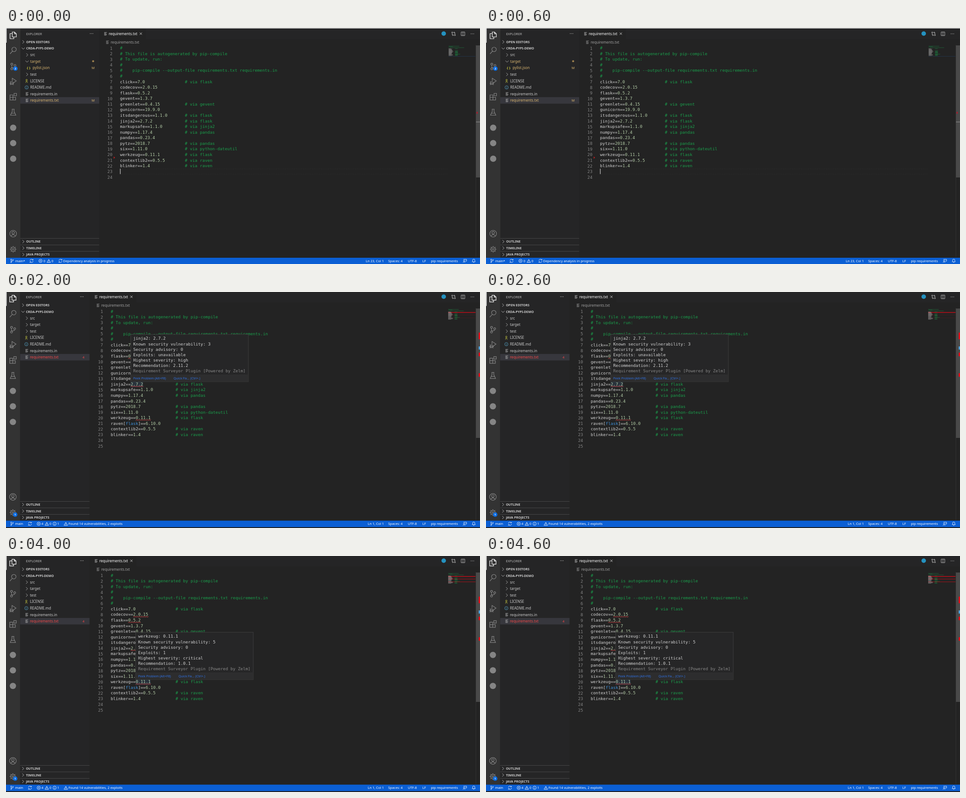
Animation, 1058 px wide and 529 px high, one loop 5 s. Source, as an HTML page:

```html
<!DOCTYPE html>
<html lang="en">
<head>
<meta charset="utf-8">
<title>Dependency check in a code editor</title>
<style>
html, body { margin: 0; width: 100%; height: 100%; overflow: hidden; background: #222; }
svg { display: block; width: 1058px; height: 529px; }
text { white-space: pre; font-family: "Noto Sans", "Open Sans", sans-serif; }
.mono { font-family: "DejaVu Sans Mono", monospace; font-size: 9.25px; }
</style>
</head>
<body>
<svg id="stage" viewBox="0 0 1058 529"></svg>
<script>
const W = 1058, H = 529, CHAR = 5.57, LINE = 12.565, ROW = 14.57;
const STEP = 1000;

const HEADER = [
  '#', '# This file is autogenerated by pip-compile', '# To update, run:', '#',
  '#    pip-compile --output-file requirements.txt requirements.in', '#'
];
const PACKAGES = [
  'click==7.0 flask', 'codecov==2.0.15', 'flask==0.5.2', 'gevent==1.3.7',
  'greenlet==0.4.15 gevent', 'gunicorn==19.9.0', 'itsdangerous==1.1.0 flask',
  'jinja2==2.7.2 flask', 'markupsafe==1.1.0 jinja2', 'numpy==1.17.4 pandas',
  'pandas==0.23.4', 'pytz==2018.7 pandas', 'six==1.11.0 python-dateutil',
  'werkzeug==0.11.1 flask', 'raven[flask]==6.10.0', 'contextlib2==0.5.5 raven',
  'blinker==1.4 raven'
];
const PROBLEMS = { codecov: '#f14c4c', flask: '#f14c4c', gunicorn: '#3794ff', jinja2: '#f14c4c', werkzeug: '#f14c4c' };

const BUSY = { busy: true, side: 208, dx: 0, dy: 0, bg: '#232323', bar: '#0b5fd4', comment: '#1a9f4c' };
const DONE = { side: 188, dx: 0, dy: -2, bg: '#1f1f1f', bar: '#0664cc', comment: '#459c42' };
const HOVER = { ...DONE, side: 187, dx: -0.6, bg: '#232323', bar: '#0b5fd4', comment: '#1a9f4c' };
const SCENES = [
  BUSY,
  { ...DONE, notice: true },
  { ...HOVER, faded: true, tip: { x: 278.5, y: 95, line: 14, facts: ['jinja2', '2.7.2', 3, 0, 'unavailable', 'high', '2.11.2'] } },
  { ...HOVER, faded: true, cursor: true, tip: { x: 289.5, y: 71, line: 12, facts: ['gunicorn', '19.9.0', 0, 1, 'unavailable', 'medium', '20.0.4'] } },
  { ...HOVER, tip: { x: 289.5, y: 171, line: 20, facts: ['werkzeug', '0.11.1', 5, 0, 1, 'critical', '1.0.1'] } }
];

// Drawing helpers; y is the vertical middle of text and icons.
const rect = (x, y, w, h, fill, extra = '') => `<rect x="${x}" y="${y}" width="${w}" height="${h}" fill="${fill}" ${extra}/>`;
const circle = (x, y, r, fill) => `<circle cx="${x}" cy="${y}" r="${r}" fill="${fill}"/>`;
const label = (x, y, s, fill = '#ccc', size = 8.1, extra = '') =>
  `<text x="${x}" y="${y + size * 0.36}" font-size="${size}" fill="${fill}" ${extra}>${s}</text>`;
const mono = (x, y, s, fill = '#d4d4d4', extra = '') => `<text class="mono" x="${x}" y="${y + 3.2}" fill="${fill}" ${extra}>${s}</text>`;
const span = (s, fill) => `<tspan fill="${fill}">${s}</tspan>`;
const ring = (x, y, r) => `M${x - r} ${y}a${r} ${r} 0 1 0 ${2 * r} 0a${r} ${r} 0 1 0 ${-2 * r} 0`;
const spokes = Array.from({ length: 8 }, (_, i) => {
  const c = Math.cos(i * Math.PI / 4), s = Math.sin(i * Math.PI / 4);
  return `M${5 * c} ${5 * s}L${7.3 * c} ${7.3 * s}`;
}).join('');

const ICONS = {
  files: 'M-2-7.5h5l4 4v7h-9zM3-7.5v4h4M-2-4h-5v11.500h8.500v-4',
  search: ring(2, -2, 5) + 'M-1.500 2L-7 8',
  git: ring(-3, -5, 2.2) + ring(-3, 5.500, 2.2) + ring(4, -2, 2.2) + 'M-3-3v6M4 0q0 3-7 3',
  debug: 'M-2-1v-6.500l9 6-7 5' + ring(-3, 3.500, 3) + 'M-8 4h10M-7 0l2 1M-7 7.500l2-2M1 7.500l-2-2',
  extensions: 'M-7-4h6.500v5.500h6v6h-12.500zM-7 1.500h6.500v6M2-7.500h5.500v5.500h-5.500z',
  beaker: 'M-3-7h6M-2-7v5l-4 8.500h12l-4-8.500v-5M-4 2h8',
  account: ring(0, 0, 7.5) + ring(0, -2, 2.8) + 'M-5 5.500q5-7 10 0',
  gear: ring(0, 0, 5) + ring(0, 0, 2) + spokes,
  right: 'M-1.700-3.500l3.500 3.500-3.500 3.500',
  down: 'M-3.500-1.700l3.500 3.500 3.500-3.500',
  close: 'M-2.500-2.500l5 5m0-5l-5 5',
  lines: 'M-3-3h6M-3-1h4M-3 1h6M-3 3h5',
  branch: ring(-2, -3, 1) + ring(-2, 3, 1) + ring(2, -2, 1) + 'M-2-2v4M2-1q0 2-4 2',
  sync: 'M-3.500-.5a3.500 3.500 0 0 1 6.500-1.500M3.500.5a3.500 3.500 0 0 1-6.500 1.500M1-2h2.500v-2M-1 2h-2.500v2',
  error: ring(0, 0, 3.7) + 'M-1.500-1.500l3 3m0-3l-3 3',
  warning: 'M0-3.500l4 7h-8zM0-1v2M0 2v.8',
  info: ring(0, 0, 3.7) + 'M0-2v.8M0-.3v2.500',
  bell: 'M-3.500 2h7l-1-1.500v-2a2.500 2.500 0 0 0-5 0v2zM-1 3.500h2',
  feedback: ring(-1.5, 0, 1.5) + 'M-4 4q2.500-4 5 0M-3-3.500h7v4h-2l-1 1',
  compare: ring(-3, -3, 1.2) + ring(3, 3, 1.2) + 'M-3-1.500v4.500h3M3 1.500v-4.500h-3M-1.500 1.500l1.500 1.500-1.500 1.500M1.500-1.500l-1.500-1.500 1.500-1.500',
  split: 'M-4-4h8v8h-8zM0-4v8',
  key: ring(0, -2, 1.6) + 'M-.5 0l-1.500 4M.5 0l1.500 4'
};
const icon = (name, x, y, color = '#c5c5c5', width = 0.9, scale = 1) =>
  `<path d="${ICONS[name]}" transform="translate(${x} ${y}) scale(${scale})" fill="none" stroke="${color}" stroke-width="${width}"/>`;
const dots = (x, y) => [-3, 0, 3].map(d => circle(x + d, y, 0.7, '#c5c5c5')).join('');
const badge = (x, y, s) => circle(x, y, 5, '#0b6be0') + label(x, y, s, '#fff', 6, 'text-anchor="middle" font-weight="700"');

function activityBar(s) {
  const y = s.busy ? 0 : -1.7;
  let out = rect(0, 0, 32 + s.dx, H, '#333') + rect(0, 0, 1.3, 33 + y, '#fff') + icon('files', 16 + s.dx, 16.5 + y, '#fff', 1.2);
  [['search', 50], ['git', 86], ['debug', 120], ['extensions', 154], ['beaker', 189], ['account', 461], ['gear', 496]]
    .forEach(([name, at]) => out += icon(name, 16 + s.dx, at + y, '#858585', 1.2));
  [223.5, 258, 293].forEach(at => out += circle(16 + s.dx, at + y, 7, '#858585'));
  if (s.busy) out += badge(21, 91, 2);
  if (s.tip) out += badge(20.5, 499, 1);
  return out;
}

function sideBar(s) {
  const { side, busy, dx, dy } = s;
  let out = rect(32, 0, side - 32, H, '#252526') + label(45, 13 + dy, 'EXPLORER', '#bbb', 7.3) + dots(side - 17, 12.5 + dy);
  const section = (y, name, arrow = 'right') =>
    icon(arrow, 38.5, y) + label(45, y, name, '#ccc', 7.2, 'font-weight="700"');
  let y = busy ? 31.2 : 29.6;
  out += section(y, 'OPEN EDITORS') + section(y += ROW, 'CRDA-PYPI-DEMO', 'down');

  const changed = '#d9b56f';
  const current = busy ? changed : '#f04747';
  const rows = [
    ['right', 'src'],
    busy ? ['down', 'target', changed] : ['right', 'target'],
    ...(busy ? [['json', 'pylist.json', changed, 'M']] : []),
    ['right', 'test'], ['key', 'LICENSE'], ['info', 'README.md'], ['lines', 'requirements.in'],
    ['lines', 'requirements.txt', current, busy ? 'M' : '4']
  ];
  rows.forEach(([kind, name, color = '#ccc', mark], i) => {
    y += ROW;
    if (i === rows.length - 1) out += rect(32, y - 7.3, side - 32, ROW, '#37373d');
    if (kind === 'json') out += label(46.5, y, '{ }', '#cbcb41', 7.5, 'font-weight="700"');
    else out += icon(kind, kind === 'key' || kind === 'info' ? 46 : 47, y,
      { key: '#cbcb41', info: '#519aba' }[kind] || '#b8b8b8');
    out += label(kind === 'json' ? 59.5 : 54, y, name, color);
    if (mark) out += label(side - 13.5, y, mark, color, 7.6, 'text-anchor="middle"');
    else if (color === changed) out += circle(side - 13.5, y - 0.5, 2.2, '#a0834f');
  });

  ['OUTLINE', 'TIMELINE', 'JAVA PROJECTS'].forEach((name, i) => {
    const at = (busy ? 478.8 : 476.5) + i * 14.5;
    out += rect(32, at - 7.5, side - 32, 0.8, '#505050') + section(at, name);
  });
  return `<g transform="translate(${dx})">${out}</g>`;
}

function tabBar(s) {
  const { side, dy } = s, y = 13 + dy;
  return rect(side, 0, W - side, 25.5 + dy, '#252526') + rect(side, 0, 104, 25.5 + dy, s.bg)
    + icon('lines', side + 14.2, y) + label(side + 21.3, y, 'requirements.txt', '#fff')
    + icon('close', side + 93, y - 0.3, '#ddd')
    + icon('lines', side + 18.5, 32 + dy, '#a0a0a0') + label(side + 25.7, 32 + dy, 'requirements.txt', '#a0a0a0')
    + circle(977, y - 0.5, 5, '#2492c0') + icon('compare', 999, y) + icon('split', 1020, y) + dots(1041, y);
}

const packagesIn = s => PACKAGES.filter(p => !s.busy || !p.startsWith('raven'));

function packageLine(entry, comment) {
  const [spec, via] = entry.split(' '), [name, version] = spec.split('==');
  const styled = name.replace(/\[(\w+)\]/, (_, extra) => `[${span(extra, '#3f8fd8')}]`);
  return `${styled}==${span(version, '#b5cea8')}`
    + (via ? ' '.repeat(26 - spec.length) + span('# via ' + via, comment) : '');
}

function squiggle(x, y, width, color) {
  let d = `M${x} ${y}`;
  for (let i = 0; i < width / 2; i++) d += `l2 ${i % 2 ? 1.6 : -1.6}`;
  return `<path d="${d}" fill="none" stroke="${color}" stroke-width=".9"/>`;
}

function editor(s) {
  const packages = packagesIn(s), left = s.busy ? 254.5 : 233.7, top = s.busy ? 45 : 43.3;
  const lineY = n => top + (n - 1) * LINE;
  const count = HEADER.length + packages.length + 2;
  let out = '';
  for (let n = 1; n <= count; n++) out += mono(left - 17, lineY(n) + 0.5, n, '#858585', 'text-anchor="end"');
  HEADER.forEach((line, i) => out += mono(left, lineY(i + 1), line, s.comment));
  packages.forEach((entry, i) => {
    const n = i + HEADER.length + 1, y = lineY(n), [name, version] = entry.split(' ')[0].split('==');
    const x = left + (name.length + 2) * CHAR, width = version.length * CHAR;
    if (s.tip && s.tip.line === n) out += rect(x, y - 6, width, LINE, '#28323c');
    out += mono(left, y, packageLine(entry, s.comment));
    if (!s.busy && PROBLEMS[name]) out += squiggle(x, y + 5.8, width, PROBLEMS[name]);
  });
  if (s.busy) {
    const y = lineY(23);
    for (const edge of [y - 5.5, y + 6])
      out += `<path d="M255 ${edge}H985" stroke="#303030" stroke-width=".7" stroke-dasharray="2 2"/>`;
    out += rect(254.5, y - 6, 1.2, 12, '#d0d0d0') + '<path d="M240.500 288l3 2.500-3 2.500z" fill="#c02020"/>';
  }
  if (s.cursor) out += rect(left, top - 6, 1.1, 12, '#d0d0d0');
  return out;
}

function miniMap(s) {
  const x = s.busy ? 988 : 987, top = s.busy ? 39.5 : 37.7, pitch = 1.05;
  const bar = (n, col, length, color) => rect(x + col * 0.55, top + n * pitch, length * 0.55, 0.65, color, 'opacity=".7"');
  let out = '';
  HEADER.forEach((line, i) => {
    const body = line.slice(1).trim();
    out += bar(i, 0, 1, s.comment) + bar(i, line.length - body.length, body.length, s.comment);
  });
  packagesIn(s).forEach((entry, i) => {
    const n = i + HEADER.length, [spec, via] = entry.split(' ');
    if (!s.busy && PROBLEMS[spec.split('==')[0]] === '#f14c4c')
      out += rect(x, top + n * pitch - 0.2, 61, 1, '#a8121b', s.faded && n > 8 ? 'opacity=".2"' : '');
    out += bar(n, 0, spec.length, '#bbb');
    if (via) out += bar(n, 26, via.length + 6, s.comment);
  });
  if (s.busy) out += rect(x, 63, 60, 0.8, '#253850');
  out += rect(1048.5, 38 + s.dy, 0.7, 475, '#383838');
  if (!s.notice) out += rect(1049, 39 + s.dy, 9, s.busy ? 296 : 290, '#494949');
  if (s.busy) out += rect(1050, 188, 3, 4, '#a02030') + rect(1049, 210, 9, 1.2, '#8a8a8a');
  else [[91, 15, '#e00b16'], [122, 7, '#4d9fd8'], [136, 8, '#e00b16'], [182, 8, '#e00b16']]
    .forEach(([y, h, color]) => out += rect(1055, y, 3, h, color));
  return out;
}

function statusBar(s) {
  const y = s.busy ? 522 : 519.5;
  const put = (x, text) => label(x, y, text, '#fff', 7.45);
  const sign = (name, x) => icon(name, x, y, '#fff', 0.8);
  let out = rect(0, y - 7, W, H - y + 7, '#222') + rect(0, y - 7, W, s.busy ? 14 : 14.5, s.bar) + sign('branch', 13.5);
  if (s.busy) {
    out += put(20.8, 'main*') + sign('sync', 57) + sign('error', 77) + put(83.5, '0') + sign('warning', 95.5) + put(101.5, '0')
      + sign('sync', 121.5) + put(127.5, 'Dependency analysis in progress') + put(803, 'Ln 23, Col 1');
  } else {
    out += put(20.5, 'main') + sign('sync', 53.5) + sign('error', 73) + put(79, '4') + sign('warning', 91) + put(97, '0')
      + sign('info', 108.5) + put(114.5, '1') + sign('warning', 133.5)
      + put(139.5, 'Found 14 vulnerabilities, 2 exploits') + put(807.5, 'Ln 1, Col 1');
  }
  out += put(853, 'Spaces: 4') + put(897, 'UTF-8') + put(929.5, 'LF') + put(948.5, 'pip requirements')
    + sign('feedback', 1024) + sign('bell', 1044);
  return s.notice ? out + circle(1046.5, y - 2.5, 1.8, '#fff') : out;
}

function notice() {
  return rect(753.5, 450, 301, 58, '#111', 'opacity=".5"') + rect(755, 451, 298, 55, '#052f52')
    + icon('warning', 767, 464.5, '#d8b820', 0.9, 1.1)
    + label(775.5, 465, 'Found 14 vulnerabilities, 2 exploits. Powered by ' + span('Zelm', '#2f8df0'), '#d8d8d8')
    + icon('gear', 1025, 464.5, '#ccc', 1.4, 0.62) + icon('close', 1041, 464.5, '#ccc')
    + label(762, 488.5, 'Source: Requirement Surveyor (Exte…', '#c8ccd0', 7.3)
    + rect(901, 479.5, 145, 18, '#0861ba') + label(907.5, 488.5, 'Open the detailed vulnerability report', '#fff', 7.45);
}

function tooltip({ x, y, facts }) {
  const [name, version, known, advisory, exploits, severity, advice] = facts;
  const lines = [
    `${name}: ${version}`, `Known security vulnerability: ${known}`, `Security advisory: ${advisory}`,
    `Exploits: ${exploits}`, `Highest severity: ${severity}`, `Recommendation: ${advice}`,
    span('Requirement Surveyor Plugin [Powered by Zelm]', '#888')
  ];
  return rect(x, y, 262.5, 106, '#262627', 'stroke="#454545" stroke-width=".8"')
    + rect(x + 0.4, y + 90, 261.7, 15.6, '#2d2d2e')
    + lines.map((line, i) => mono(x + 5.5, y + 9.2 + i * 12.17, line)).join('')
    + label(x + 5.5, y + 98.7, 'Peek Problem (Alt+F8)', '#2f72e6', 7.1)
    + label(x + 95.5, y + 98.7, 'Quick Fix... (Ctrl+.)', '#2f72e6', 7.1);
}

function drawScene(s) {
  return rect(0, 0, W, H, s.bg) + sideBar(s) + activityBar(s) + tabBar(s) + editor(s) + miniMap(s)
    + (s.tip ? tooltip(s.tip) : '') + (s.notice ? notice() : '') + statusBar(s)
    + (s.busy ? rect(0, 0, W, 1, '#f0f0f0') : '');
}

const stage = document.getElementById('stage');
const pictures = SCENES.map(drawScene);
let shown = -1;
function tick() {
  const index = Math.floor(performance.now() / STEP) % SCENES.length;
  if (index !== shown) stage.innerHTML = pictures[shown = index];
  requestAnimationFrame(tick);
}
tick();
</script>
</body>
</html>
```
